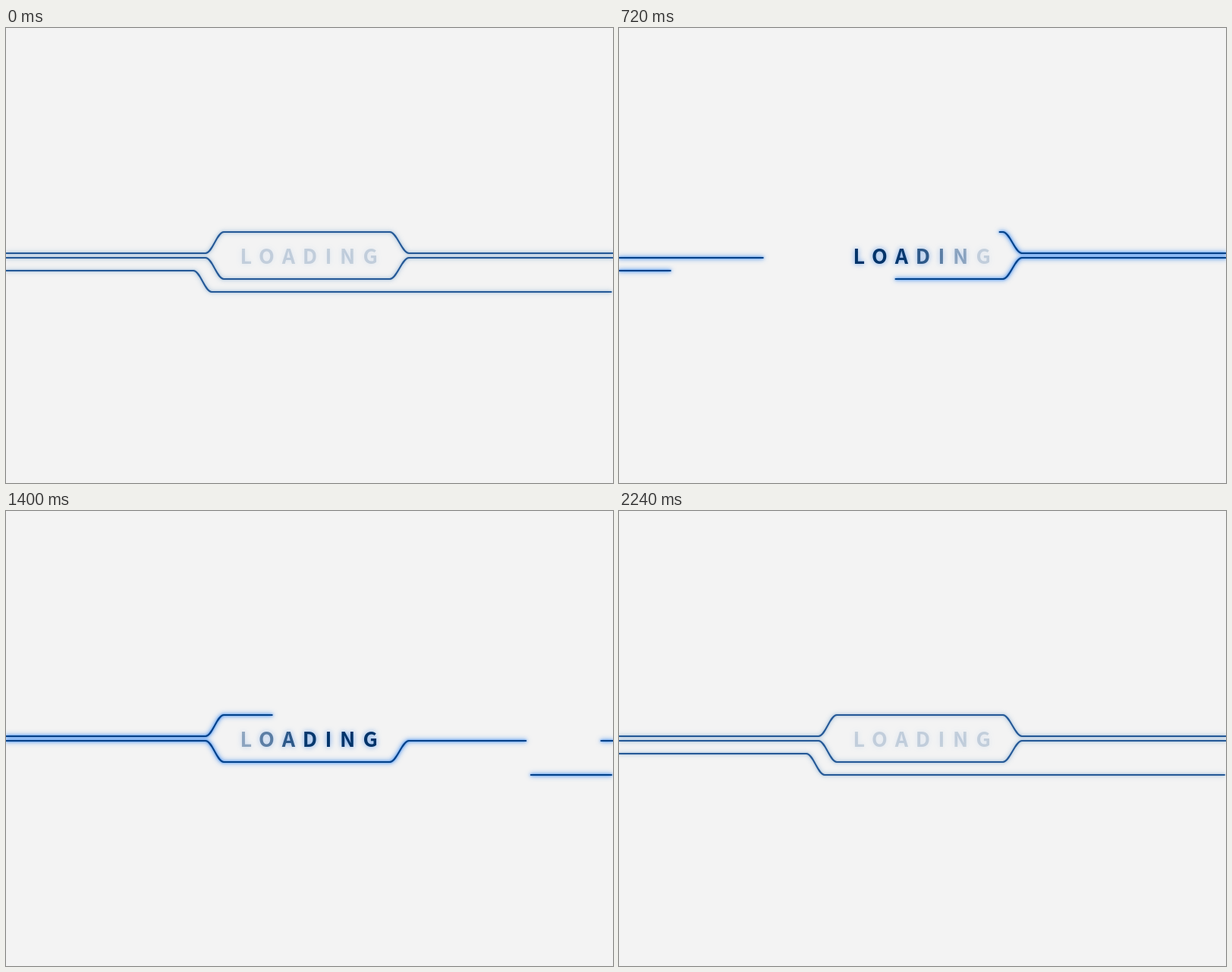
An HTML page for the animation above (2400 ms loop, 800x600 px).

```html
<!DOCTYPE html>
<html lang="en">
<head>
<meta charset="utf-8">
<title>Loading</title>
<style>
  html, body { margin: 0; width: 100%; height: 100%; overflow: hidden; background: #f3f3f3; }
  svg { display: block; width: 800px; height: 600px; }
  #lines { fill: none; stroke-width: 2; stroke-linecap: round; }
  #word {
    font: 700 27px "Noto Sans CJK JP", "Noto Sans CJK SC", "Noto Sans CJK", "Open Sans", sans-serif;
    text-anchor: middle;
    fill: #003369;
    filter: drop-shadow(0 0 3.5px rgba(40, 120, 230, .7));
  }
</style>
</head>
<body>
<svg viewBox="0 0 800 600">
  <g id="lines"></g>
  <text id="word" y="311"></text>
</svg>
<script>
const NS = 'http://www.w3.org/2000/svg';
const STEP = 40, STEPS = 60, LAST = 56;
const lines = document.getElementById('lines');
const word = document.getElementById('word');

const add = (parent, tag, attrs) => {
  const el = document.createElementNS(NS, tag);
  for (const key in attrs) el.setAttribute(key, attrs[key]);
  return parent.appendChild(el);
};
const clamp = x => Math.min(1, Math.max(0, x));
const sine = x => (1 - Math.cos(Math.PI * clamp(x))) / 2;
const lateSine = x => { const s = clamp(x); return sine(s * (.73 + .27 * s)); };
const mix = (a, b, k) => a.map((v, i) => v + (b[i] - v) * k);
const rgb = c => `rgb(${c.map(Math.round)})`;

// Each wire is wiped away, then drawn again: [start step, length in steps].
const wires = [
  { d: 'M0 297H263c9 0 15-28 24-28H506c9 0 16 28 25 28H800',
    wipe: [0, 31.6], draw: [17.3, 34], ease: lateSine },
  { d: 'M0 303H263c9 0 15 28 24 28H506c9 0 16-28 25-28H800',
    wipe: [0, 38.7], draw: [6, 38.7], ease: sine },
  { d: 'M798 348H271c-9 0-15-28-24-28H0',
    wipe: [0, 22.5], draw: [30, 22.5], ease: sine }
];
for (const w of wires) {
  w.parts = [0, 1].map(() => add(lines, 'path', { d: w.d, pathLength: 1 }));
}

const centers = [316.2, 343.5, 372.5, 400.5, 425, 450, 480.2];
const letters = [...'LOADING'].map((ch, i) => {
  const el = add(word, 'tspan', { x: centers[i] });
  el.textContent = ch;
  return el;
});

function showSpan(path, from, to) {
  const len = to - from;
  path.style.display = len > .002 ? '' : 'none';
  path.style.strokeDasharray = `${len} 2`;
  path.style.strokeDashoffset = -from;
}

function render(step) {
  const at = step + .3;
  for (const { wipe, draw, ease, parts } of wires) {
    showSpan(parts[0], sine((at - wipe[0]) / wipe[1]), 1);
    showSpan(parts[1], 0, ease((at - draw[0]) / draw[1]));
  }

  // Glow swells and fades symmetrically around the middle of the run.
  const k = sine(Math.min(step, LAST - step) / 20);
  const glow = mix([70, 130, 190], [45, 130, 240], k).map(Math.round);
  const shade = `rgba(${glow}, ${.42 + .46 * k})`;
  lines.style.stroke = rgb(mix([36, 88, 150], [0, 64, 136], k));
  lines.style.filter = `drop-shadow(0 0 1.5px ${shade}) drop-shadow(0 0 3px ${shade})`;

  letters.forEach((el, i) => {
    const on = (step - 3 * i) / 12.5;
    const off = (LAST - 3 * (6 - i) - step) / 12.5;
    el.style.fillOpacity = .17 + .83 * clamp(Math.min(on, off));
  });
}

const begin = performance.now();
let shown = -1;
function tick() {
  const elapsed = Math.max(0, performance.now() - begin);
  const step = Math.min(LAST, Math.floor(elapsed / STEP) % STEPS);
  if (step !== shown) render(shown = step);
  requestAnimationFrame(tick);
}
tick();
</script>
</body>
</html>
```
